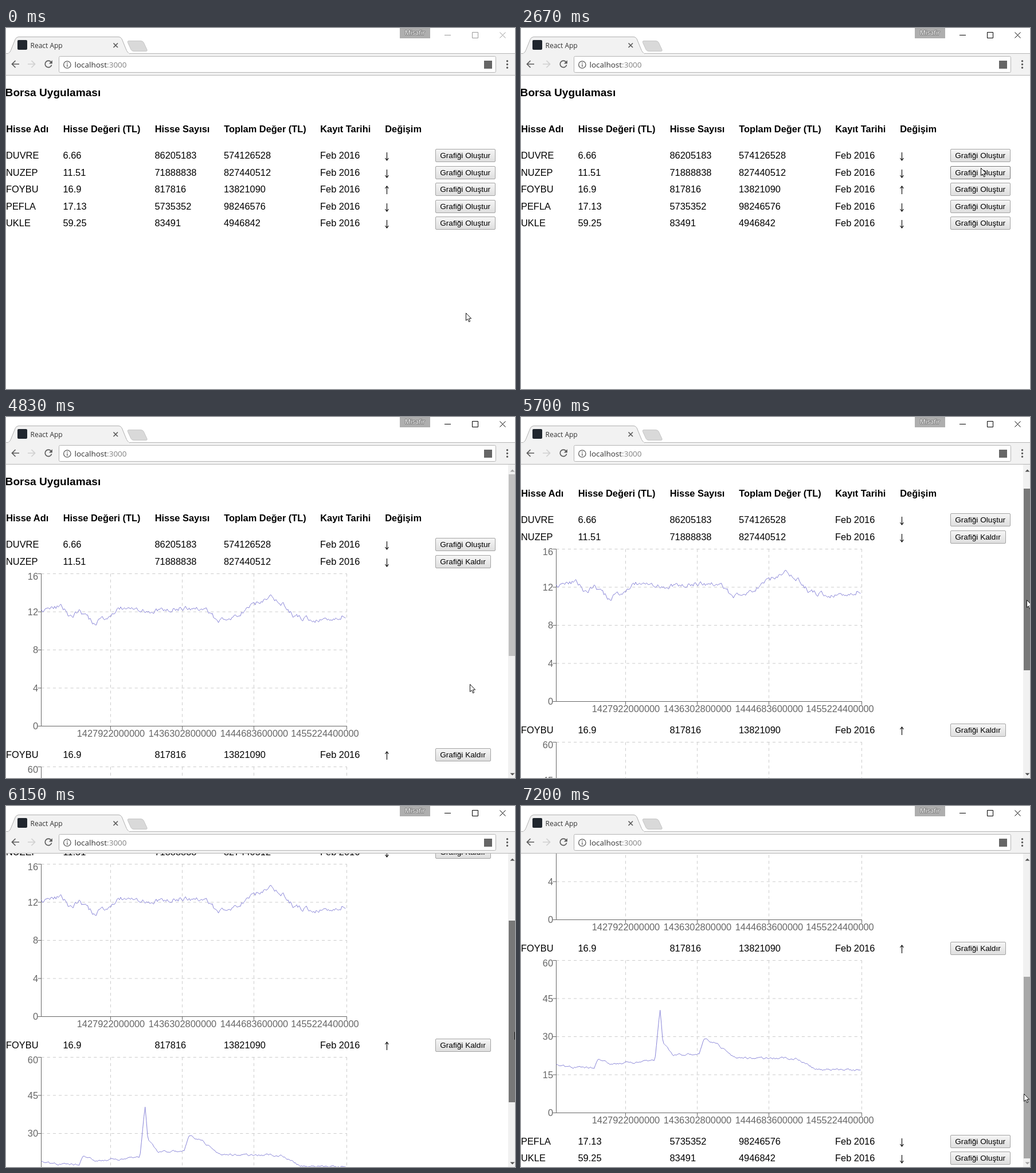
These frames come from a looping animation (888x630 px, 7320 ms). An HTML page:

```html
<!DOCTYPE html>
<html lang="tr">
<head>
<meta charset="utf-8">
<title>Borsa Uygulaması</title>
<style>
html, body { margin: 0; width: 100%; height: 100%; overflow: hidden; background: #fff; }
svg { display: block; }
text { white-space: pre; }
.page { font: 16.4px "Liberation Sans", Arial, sans-serif; }
.head { font-weight: bold; }
.title { font-weight: bold; font-size: 19.1px; }
.ui { font-family: "Open Sans", sans-serif; }
.btn text { font-size: 13.65px; }
.btn rect { fill: url(#face); stroke: #a3a3a3; }
.btn.hover rect { stroke: #777; }
.btn.press rect { fill: url(#pressed); stroke: #777; }
.trend { fill: none; stroke: #111; stroke-width: 1.2; }
.grid { stroke: #ccc; stroke-dasharray: 5.1 5.1; fill: none; }
.axis { stroke: #666; fill: none; }
.tick { fill: #666; }
.series { stroke: #8884d8; fill: none; stroke-linejoin: round; }
.icon { fill: none; stroke: #5a5a5a; stroke-width: 1.7; }
</style>
</head>
<body>
<svg width="888" height="630" viewBox="0 0 888 630">
  <defs>
    <linearGradient id="face" x2="0" y2="1"><stop stop-color="#f6f6f6"/><stop offset="1" stop-color="#dedede"/></linearGradient>
    <linearGradient id="pressed" x2="0" y2="1"><stop stop-color="#d2d2d2"/><stop offset="1" stop-color="#e6e6e6"/></linearGradient>
    <clipPath id="view"><rect y="83" width="888" height="547"/></clipPath>
  </defs>
  <rect width="888" height="630" fill="#fff"/>

  <g clip-path="url(#view)"><g id="page" class="page">
    <text class="title" x="-1.4" y="119">Borsa Uygulaması</text>
  </g></g>

  <g id="bar">
    <rect x="876" y="83" width="12" height="547" fill="#f1f1f1"/>
    <rect id="thumb" x="877" width="11"/>
    <path id="up" d="M879.5 95.500l4-4 4 4z"/>
    <path id="down" d="M879.5 621.500l4 4 4-4z"/>
  </g>

  <g class="ui">
    <rect y="44" width="888" height="39" fill="#f2f2f2"/>
    <path d="M0 44.5H888M0 82.5H888" stroke="#b6b6b6"/>
    <path d="M3 45C7 43 8 40 10 35L16 20Q18 15.5 22 15.5H196Q200.5 15.5 202.5 20L209 36Q212 44 216 45" fill="#f2f2f2" stroke="#b0b0b0"/>
    <path d="M4 45H215" stroke="#f2f2f2" stroke-width="2"/>
    <path d="M214 22.5H235Q239 22.5 240.5 26L246 38Q247 40.5 244 40.5H223Q219.5 40.5 218 37.5L212.5 25.5Q211.5 22.5 214 22.5Z" fill="#d9d9d9" stroke="#c6c6c6"/>
    <rect x="20" y="21" width="17" height="17" rx="2" fill="#20262e"/>
    <text x="42.5" y="34.5" font-size="12" fill="#333">React App</text>
    <path class="icon" d="M187.5 26.5l7.5 7.5m0-7.5l-7.5 7.5"/>
    <path class="icon" d="M23 63H10.5M16.5 57l-6 6 6 6"/>
    <path class="icon" d="M38 63h12.5M44.5 57l6 6-6 6" style="stroke:#d0d0d0"/>
    <path class="icon" d="M78.5 59.2A5.8 5.8 0 1 0 79.6 64.5"/>
    <path d="M80.8 56.2v6h-6z" fill="#5a5a5a"/>
    <rect x="92.5" y="49.5" width="762" height="28" rx="2" fill="#fff" stroke="#b4b4b4"/>
    <g class="icon" style="stroke-width:1.3"><circle cx="106.800" cy="64" r="6.200"/><path d="M106.800 60.300v1.600M106.800 63.200v4.500"/></g>
    <text x="119.5" y="68.7" font-size="13.5" fill="#333">localhost<tspan fill="#808080">:3000</tspan></text>
    <rect x="834" y="57" width="14" height="14" fill="#666"/>
    <path d="M874.5 57.8h0m0 5.700h0m0 5.700h0" stroke="#5a5a5a" stroke-width="3.4" stroke-linecap="round"/>
    <rect x="687" width="53" height="18" fill="#aeaeae"/>
    <text x="696" y="12.3" font-size="11" fill="#fff" stroke="#777" stroke-width="1.5" paint-order="stroke">Misafir</text>
    <path id="win" fill="none" d="M765 12.5h11M813.5 7.5h10v10h-10zM861.5 7.5l10 10m0-10l-10 10"/>
  </g>

  <path id="cursor" d="M.5.5V13.5L3.5 10.8 5.6 15.8 7.7 14.9 5.6 10H9.7Z" fill="#fff" stroke="#111"/>
</svg>
<script>
const LOOP = 7320, STEP = 30;
const ROW_TOP = 222.3, PITCH = 29.5, CHART_H = 307.5;
const PLOT = { left: 61.5, width: 533, height: 266 };
const COLS = [0, 99.5, 259.5, 380, 548, 661];
const HEAD = ['Hisse Adı', 'Hisse Değeri (TL)', 'Hisse Sayısı', 'Toplam Değer (TL)', 'Kayıt Tarihi', 'Değişim'];
const STOCKS = [
  ['DUVRE', '6.66', '86205183', '574126528'],
  ['NUZEP', '11.51', '71888838', '827440512'],
  ['FOYBU', '16.9', '817816', '13821090', true],
  ['PEFLA', '17.13', '5735352', '98246576'],
  ['UKLE', '59.25', '83491', '4946842']
];
// Turning points of each price line inside the plot; noise fills in the days.
const CHARTS = [
  { max: 12, noise: 4.5, turns: [[0, 40], [45, 69], [70, 58], [94, 82], [125, 66], [177, 54], [205, 75], [250, 61],
    [295, 66], [308, 93], [390, 78], [400, 62], [415, 66], [451, 108], [533, 110]] },
  { max: 16, noise: 4, turns: [[0, 66], [33, 55], [52, 77], [66, 67], [94, 87], [130, 64], [154, 56], [195, 66],
    [258, 59], [290, 66], [308, 83], [330, 80], [397, 40], [420, 51], [443, 75], [480, 82], [533, 70]] },
  { max: 60, noise: 1.8, turns: [[0, 184], [66, 188], [73, 170], [92, 181], [172, 176], [181, 84], [186, 144],
    [204, 164], [250, 163], [257, 136], [280, 145], [312, 171], [420, 171], [452, 190], [533, 192]] }
];

const CLICKS = [
  { row: 0, press: 750, at: 900, open: true },
  { row: 0, press: 1980, at: 2070, open: false },
  { row: 1, press: 3060, at: 3210, open: true },
  { row: 2, press: 4380, at: 4440, open: true }
];
const smooth = u => u * u * (3 - 2 * u), out = u => Math.sin(u * Math.PI / 2), steady = u => u;
const HOME = { x: 802, y: 497 };
const MOVES = [
  { from: 0, to: 570, x: 802, y: 219, ease: smooth },
  { from: 2460, to: 2850, x: 803, y: 252, ease: out },
  { from: 3570, to: 4290, x: 803, y: 585, ease: smooth },
  { from: 4620, to: 5400, x: 881, y: 294, ease: out },
  { from: 5520, to: 5940, x: 889, y: 353, ease: steady },
  { from: 5940, to: 6390, x: 881, y: 441, ease: steady },
  { from: 6390, to: 6750, x: 877, y: 502, ease: steady }
];
const GRAB = { from: 5550, to: 7200, y: 294, max: 198, ratio: 1.722 };

const $ = id => document.getElementById(id);
function set(el, attrs) {
  for (const k in attrs) el.setAttribute(k, attrs[k]);
}
function add(parent, tag, attrs, text) {
  const el = document.createElementNS('http://www.w3.org/2000/svg', tag);
  set(el, attrs);
  if (text !== undefined) el.textContent = text;
  return parent.appendChild(el);
}

function seeded(seed) {
  return () => (seed = (seed * 16807) % 2147483647) / 2147483647;
}

function seriesPath({ turns, noise }, seed) {
  const rnd = seeded(seed), points = [];
  let j = 0, drift = 0;
  for (let x = 0; x <= PLOT.width; x += 2.132) {
    while (j < turns.length - 2 && turns[j + 1][0] < x) j++;
    const [x0, y0] = turns[j], [x1, y1] = turns[j + 1];
    drift = drift * 0.6 + (rnd() - 0.5) * 2 * noise;
    points.push((PLOT.left + x).toFixed(1) + ' ' + (y0 + (y1 - y0) * (x - x0) / (x1 - x0) + drift).toFixed(1));
  }
  return 'M' + points.join('L');
}

function buildChart(row, chart, seed) {
  const g = add(row, 'g', { transform: 'translate(0 21.5)' });
  const { left, width, height } = PLOT, right = left + width;
  for (let i = 0; i < 5; i++) {
    const y = height * i / 4;
    add(g, 'path', { class: 'grid', d: `M${left} ${y}H${right}` });
    add(g, 'path', { class: 'axis', d: `M${left - 6} ${y}h6` });
    add(g, 'text', { class: 'tick', x: 56, y: y + (i ? 5.5 : 10), 'text-anchor': 'end' }, chart.max * (4 - i) / 4);
  }
  ['1427922000000', '1436302800000', '1444683600000', '1455224400000'].forEach((label, i) => {
    const mid = 182.5 + 125 * i, x = Math.min(mid + (i === 3 ? 40 : 0), right);
    add(g, 'path', { class: 'grid', d: `M${x} 0V${height}` });
    add(g, 'path', { class: 'axis', d: `M${x} ${height}v6` });
    add(g, 'text', { class: 'tick', x: Math.min(mid + 0.5, right - 38), y: height + 18, 'text-anchor': 'middle' }, label);
  });
  add(g, 'path', { class: 'axis', d: `M${left} 0V${height}H${right}` });
  add(g, 'path', { class: 'series', d: seriesPath(chart, seed) });
  return g;
}

const page = $('page');
HEAD.forEach((h, i) => add(page, 'text', { class: 'head', x: COLS[i] + 0.2, y: 182 }, h));
const rows = STOCKS.map(([name, price, shares, total, rising], i) => {
  const g = add(page, 'g', {});
  [name, price, shares, total, 'Feb 2016'].forEach((c, k) => add(g, 'text', { x: COLS[k], y: 6 }, c));
  add(g, 'path', { class: 'trend', d: 'M664.5-5V9M661.5 5l3 4 3-4', transform: rising ? 'matrix(1 0 0 -1 0 4)' : '' });
  const btn = add(g, 'g', { class: 'btn' });
  return {
    g, btn,
    box: add(btn, 'rect', { x: 749.5, y: -10.5, height: 22, rx: 1.5 }),
    label: add(btn, 'text', { x: 757.2, y: 5 }),
    chart: CHARTS[i] && buildChart(g, CHARTS[i], 911 + i * 77)
  };
});

// Sideways motion starts late, which bends the sweep to the scrollbar.
function pointer(t) {
  let { x, y } = HOME;
  for (const m of MOVES) {
    if (t < m.from) break;
    const u = Math.min(1, (t - m.from) / (m.to - m.from));
    x += (m.x - x) * u * u;
    y += (m.y - y) * m.ease(u);
  }
  return [Math.round(x), Math.round(y)];
}

function draw(t) {
  t = Math.floor(t / STEP) * STEP;
  const [cx, cy] = pointer(t);
  const dragged = t >= GRAB.from;
  const shift = dragged ? Math.min(GRAB.max, cy - GRAB.y) : 0;
  const scroll = Math.round(shift * GRAB.ratio);
  const open = [], pressed = [];
  for (const c of CLICKS) {
    if (t >= c.at) open[c.row] = c.open;
    else if (t >= c.press) pressed[c.row] = true;
  }

  let y = ROW_TOP, count = 0;
  rows.forEach((r, i) => {
    const width = open[i] ? 96 : 104, top = Math.round(y);
    const hover = cx > 749 && cx < 750 + width && Math.abs(cy - top + scroll) < 11.5;
    set(r.g, { transform: `translate(0 ${top})` });
    set(r.box, { width });
    set(r.btn, { class: 'btn' + (pressed[i] ? ' press' : hover ? ' hover' : '') });
    r.label.textContent = open[i] ? 'Grafiği Kaldır' : 'Grafiği Oluştur';
    if (r.chart) r.chart.style.display = open[i] ? '' : 'none';
    y += PITCH;
    if (open[i]) { y += CHART_H; count++; }
  });
  set(page, { transform: `translate(0 ${-scroll})` });

  const height = count > 1 ? 317 : 485, top = 100 + shift;
  const over = cx >= 876 && cy >= top && cy <= top + height;
  $('bar').style.display = count ? '' : 'none';
  set($('thumb'), { y: top, height, fill: dragged && t < GRAB.to ? '#787878' : over ? '#a8a8a8' : '#c1c1c1' });
  set($('up'), { fill: shift > 0 ? '#505050' : '#a3a3a3' });
  set($('down'), { fill: shift < GRAB.max ? '#505050' : '#a3a3a3' });
  set($('win'), { stroke: t < CLICKS[0].press ? '#999' : '#000' });
  set($('cursor'), { transform: `translate(${cx} ${cy})` });
}

const start = performance.now();
function tick() {
  draw((performance.now() - start) % LOOP);
  requestAnimationFrame(tick);
}
tick();
</script>
</body>
</html>
```
